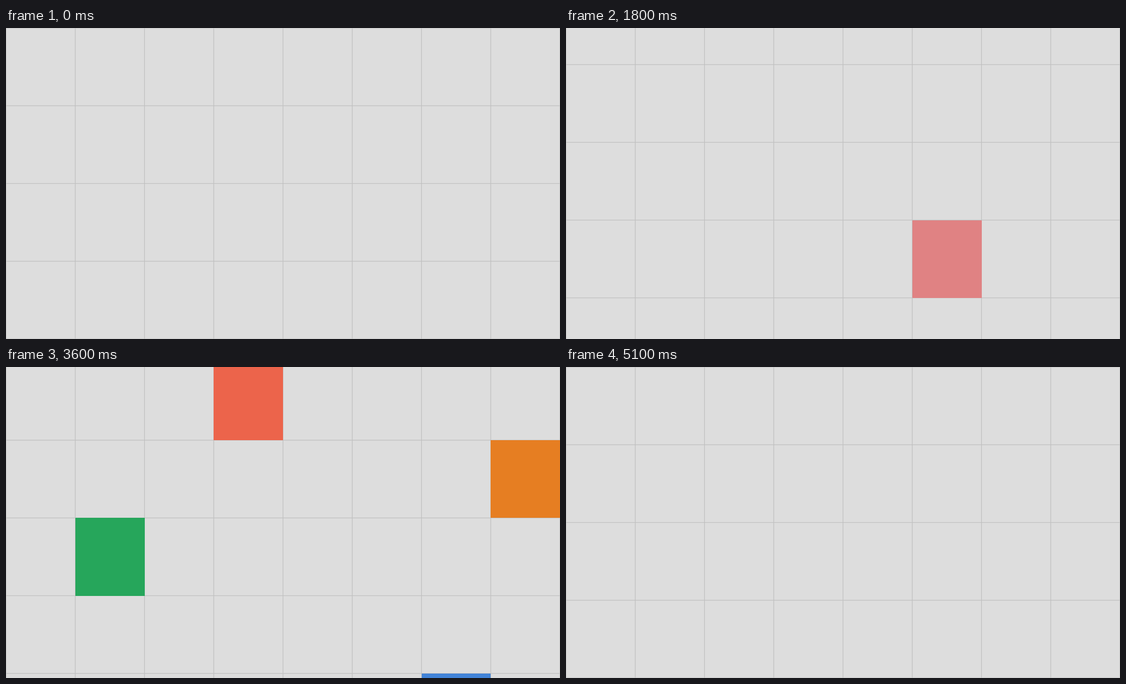
Recreate the animation shown at these times as an HTML page with a canvas. Size 998 by 561 pixels, loop 5.2 s.

```html
<!DOCTYPE html>
<html>
<head>
<meta charset="utf-8">
<title>Scrolling grid</title>
<style>
  html, body { margin: 0; height: 100%; overflow: hidden; background: #ddd; }
  canvas { display: block; }
</style>
</head>
<body>
<canvas width="998" height="561"></canvas>
<script>
const ctx = document.querySelector('canvas').getContext('2d');
const W = 998, H = 561, COLS = 8, CELL_W = W / COLS, CELL_H = H / 4;
const LOOP = 5200, TICK = 100, STEP = 66, LINE = 1.2;

// Coloured cells as [row, column, colour]; rows above the first screen are negative.
const tiles = [
  [-1, 2, '#ec644b'],
  [-6, 5, '#e08283'],
  [-10, 0, '#674172'],
  [-13, 6, '#4183d7'],
  [-15, 1, '#26a65b'],
  [-16, 7, '#e67e22'],
  [-17, 3, '#ec644b'],
  [-19, 2, '#674172'],
  [-19, 5, '#e08283']
];

function draw(time) {
  // The grid slides down at a constant speed, ten steps a second.
  const scroll = Math.floor(time % LOOP / TICK) * STEP;

  ctx.fillStyle = '#ddd';
  ctx.fillRect(0, 0, W, H);

  ctx.fillStyle = '#c0c0c0';
  for (let y = scroll % CELL_H; y <= H; y += CELL_H) ctx.fillRect(0, y - LINE / 2, W, LINE);
  for (let col = 0; col <= COLS; col++) ctx.fillRect(col * CELL_W - LINE / 2, 0, LINE, H);

  for (const [row, col, colour] of tiles) {
    const x = Math.round(col * CELL_W), right = Math.round((col + 1) * CELL_W);
    const y = Math.round(row * CELL_H + scroll), bottom = Math.round((row + 1) * CELL_H + scroll);
    ctx.fillStyle = colour;
    ctx.fillRect(x, y, right - x, bottom - y);
  }
}

function tick() {
  draw(performance.now());
  requestAnimationFrame(tick);
}
tick();
</script>
</body>
</html>
```
